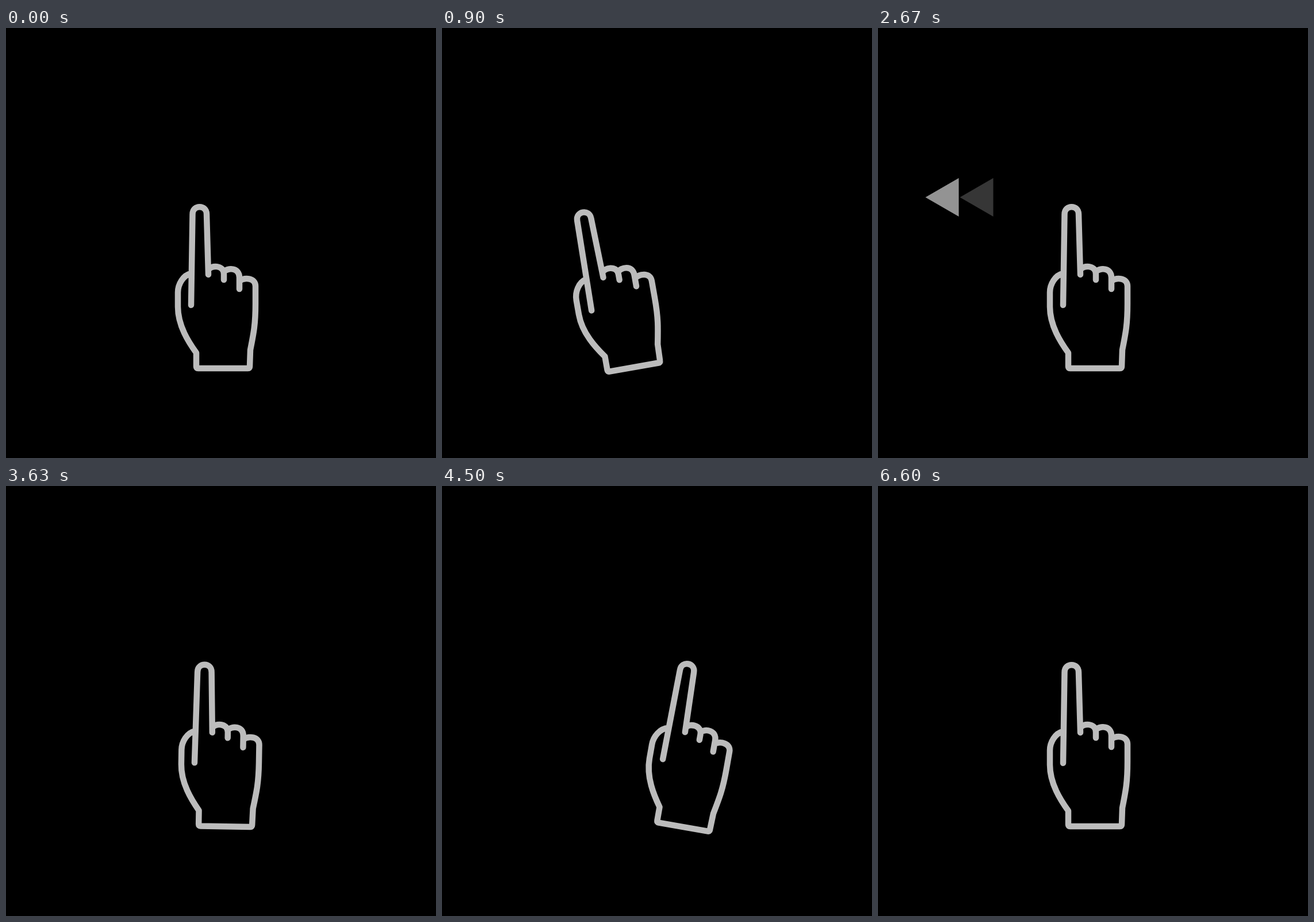
An HTML page with a canvas that plays this animation: 748 px wide and 748 px high, repeating every 9000 ms.

```html
<!DOCTYPE html>
<html lang="en">
<head>
<meta charset="utf-8">
<title>Swipe hint</title>
<style>
  html, body { margin: 0; width: 100%; height: 100%; overflow: hidden; background: #000; }
  canvas { display: block; width: 748px; height: 748px; }
</style>
</head>
<body>
<canvas id="stage" width="748" height="748"></canvas>
<script>
const ctx = document.getElementById('stage').getContext('2d');
const LOOP = 9000, STEP = 30, INK = '#bcbcbc';

// Hand: swings out and returns, SWING ms each way
const SWING = 900, ANGLE = 10 * Math.PI / 180, CENTRE = { x: 363, y: 499 };

// Arrows: two pulses each, running outwards
const PULSE = 840, STAGGER = 210, ROUNDS = 2;

const swipes = [
  { start: 0, dir: -1, dx: -59.5, dy: 2, arrowX: 260.5 },
  { start: 3600, dir: 1, dx: 58.5, dy: 0, arrowX: 497.5 }
];

const hand = new Path2D(
  'M322 482 L324.5 324 C324.5 307 349 307 349 324 L352 429' +
  'M352 421 C356 412 379 412 379 428 V438' +
  'M379 424 C385 417 406 416 406 434 V454' +
  'M406 440 C416 433 434 435 434 449 V480' +
  'C434 515 431 530 425 560 L424 589 Q424 592 421 592 H334 Q331 592 331 589 V565' +
  'C318 547 299 518 299 485 V460 C299 446 308 430 322 427'
);

const easeOut = x => 1 - (1 - x) ** 3;

function swing(t) {
  if (t <= 0 || t >= 2 * SWING) return 0;
  return t <= SWING ? easeOut(t / SWING) : 1 - easeOut(t / SWING - 1);
}

function pulse(t) {
  if (t <= 0 || t >= PULSE * ROUNDS) return 0;
  return 1 - Math.abs(2 * (t % PULSE) / PULSE - 1);
}

function drawHand({ dir, dx, dy }, amount) {
  ctx.save();
  ctx.translate(CENTRE.x + dx * amount, CENTRE.y + dy * amount);
  ctx.rotate(dir * ANGLE * amount);
  ctx.translate(-CENTRE.x, -CENTRE.y);
  ctx.strokeStyle = INK;
  ctx.lineWidth = 10.5;
  ctx.lineCap = ctx.lineJoin = 'round';
  ctx.stroke(hand);
  ctx.restore();
}

function drawArrow(x, dir, alpha) {
  ctx.globalAlpha = alpha;
  ctx.fillStyle = INK;
  ctx.beginPath();
  ctx.moveTo(x, 261);
  ctx.lineTo(x + 58 * dir, 294.5);
  ctx.lineTo(x, 328);
  ctx.fill();
  ctx.globalAlpha = 1;
}

function draw(time) {
  const swipe = swipes[time < swipes[1].start ? 0 : 1];
  const t = time - swipe.start;
  ctx.fillStyle = '#000';
  ctx.fillRect(0, 0, 748, 748);
  for (let i = 0; i < 3; i++) {
    const alpha = pulse(t - SWING - i * STAGGER);
    if (alpha > 0) drawArrow(swipe.arrowX + swipe.dir * 60 * i, swipe.dir, alpha);
  }
  drawHand(swipe, swing(t));
}

const begin = performance.now();
function tick() {
  const time = (performance.now() - begin) % LOOP;
  draw(Math.floor(time / STEP) * STEP);
  requestAnimationFrame(tick);
}
tick();
</script>
</body>
</html>
```
